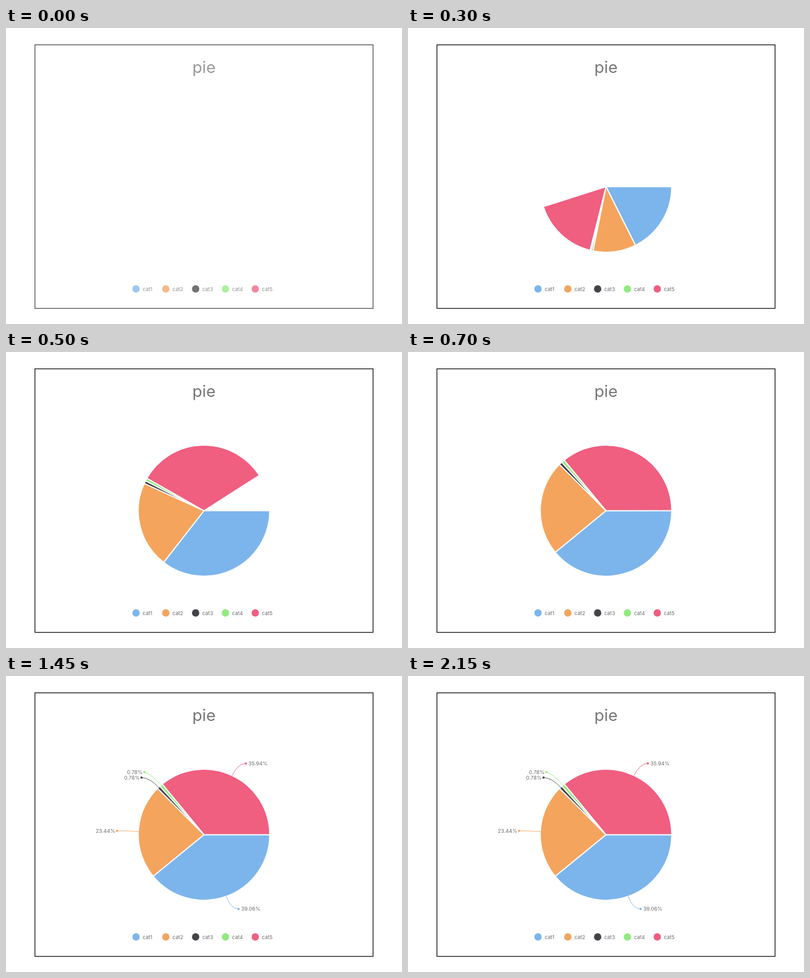
These frames come from a looping animation (720 px wide and 540 px high, 2.2 s). An HTML page:

```html
<!DOCTYPE html>
<html lang="en">
<head>
<meta charset="utf-8">
<title>pie</title>
<style>
  html, body { margin: 0; width: 100%; height: 100%; overflow: hidden; background: #fff; }
  svg { display: block; width: 720px; height: 540px; font-family: Inter, "Liberation Sans", sans-serif; }
  .frame { fill: none; stroke: #000; stroke-width: 1.3; }
  .title { font-size: 29.5px; fill: #777; text-anchor: middle; }
  .small { font-size: 9.4px; fill: #6c6c6c; }
  .slice { stroke: #fff; stroke-width: 2; }
  .leader { fill: none; stroke-width: 0.9; }
</style>
</head>
<body>
<svg viewBox="0 0 720 540">
  <g id="chart">
    <rect class="frame" x="52.6" y="30.7" width="614.8" height="480.8"/>
    <text class="title" x="360" y="82">pie</text>
    <g id="legend"></g>
    <g id="pie"></g>
    <g id="labels"></g>
  </g>
</svg>
<script>
const LOOP = 2200, STEP = 50;
const CX = 360, CY = 289.5, R = 119.5, LABEL_R = 143.8, LABEL_PAD = 14.5;
const GROW_START = -113, GROW_TIME = 855;

const values = [50, 30, 1, 1, 46];
const colors = ['#7cb5ec', '#f4a45d', '#434348', '#92ea80', '#f05e80'];
const total = values.reduce((a, b) => a + b);

const byId = id => document.getElementById(id);
const chart = byId('chart'), legend = byId('legend'), pie = byId('pie'), labels = byId('labels');

function add(parent, tag, attrs, text) {
  const el = document.createElementNS('http://www.w3.org/2000/svg', tag);
  for (const key in attrs) el.setAttribute(key, attrs[key]);
  if (text) el.textContent = text;
  parent.appendChild(el);
  return el;
}

const polar = (angle, r) => [CX + r * Math.cos(angle), CY + r * Math.sin(angle)];

let sum = 0, lastY = null;
const slices = values.map((value, i) => {
  const fill = colors[i], from = sum / total, to = (sum += value) / total;

  const x = 236.4 + 54.2 * i;
  add(legend, 'circle', { cx: x, cy: 476, r: 6.7, fill });
  add(legend, 'text', { class: 'small', x: x + 12.1, y: 480 }, 'cat' + (i + 1));

  const mid = (from + to) * Math.PI;
  const start = polar(mid, R - 0.5), bend = polar(mid, LABEL_R);
  const side = bend[0] >= CX ? 1 : -1;
  const endX = bend[0] + side * LABEL_PAD;
  // Move a label up when it would touch the previous one.
  let endY = bend[1];
  if (lastY !== null && Math.abs(endY - lastY) < 10) endY = lastY - 10;
  lastY = endY;
  add(labels, 'path', { class: 'leader', stroke: fill, d: `M${start}Q${bend} ${endX},${endY}` });
  add(labels, 'circle', { cx: endX, cy: endY, r: 2, fill });
  add(labels, 'text', {
    class: 'small',
    x: endX + (side > 0 ? 4.7 : -3.2),
    y: endY + 3.6,
    'text-anchor': side > 0 ? 'start' : 'end'
  }, (value / total * 100).toFixed(2) + '%');

  return { from, to, el: add(pie, 'path', { class: 'slice', fill }) };
});

const easeInOut = u => u < 0.5 ? 4 * u ** 3 : 1 - 4 * (1 - u) ** 3;

function render(time) {
  const t = Math.floor(time % LOOP / STEP) * STEP;
  const u = Math.min(1, (t - GROW_START) / GROW_TIME);
  const turn = easeInOut(u) * 2 * Math.PI;
  for (const { from, to, el } of slices) {
    el.setAttribute('d', `M${CX},${CY}L${polar(from * turn, R)}A${R},${R} 0 0 1 ${polar(to * turn, R)}Z`);
  }
  chart.setAttribute('opacity', t < STEP ? 0.75 : 1);
  pie.style.display = t < STEP ? 'none' : '';
  labels.style.display = u < 1 ? 'none' : '';
}

const origin = performance.now();
function tick() {
  render(performance.now() - origin);
  requestAnimationFrame(tick);
}
tick();
</script>
</body>
</html>
```
